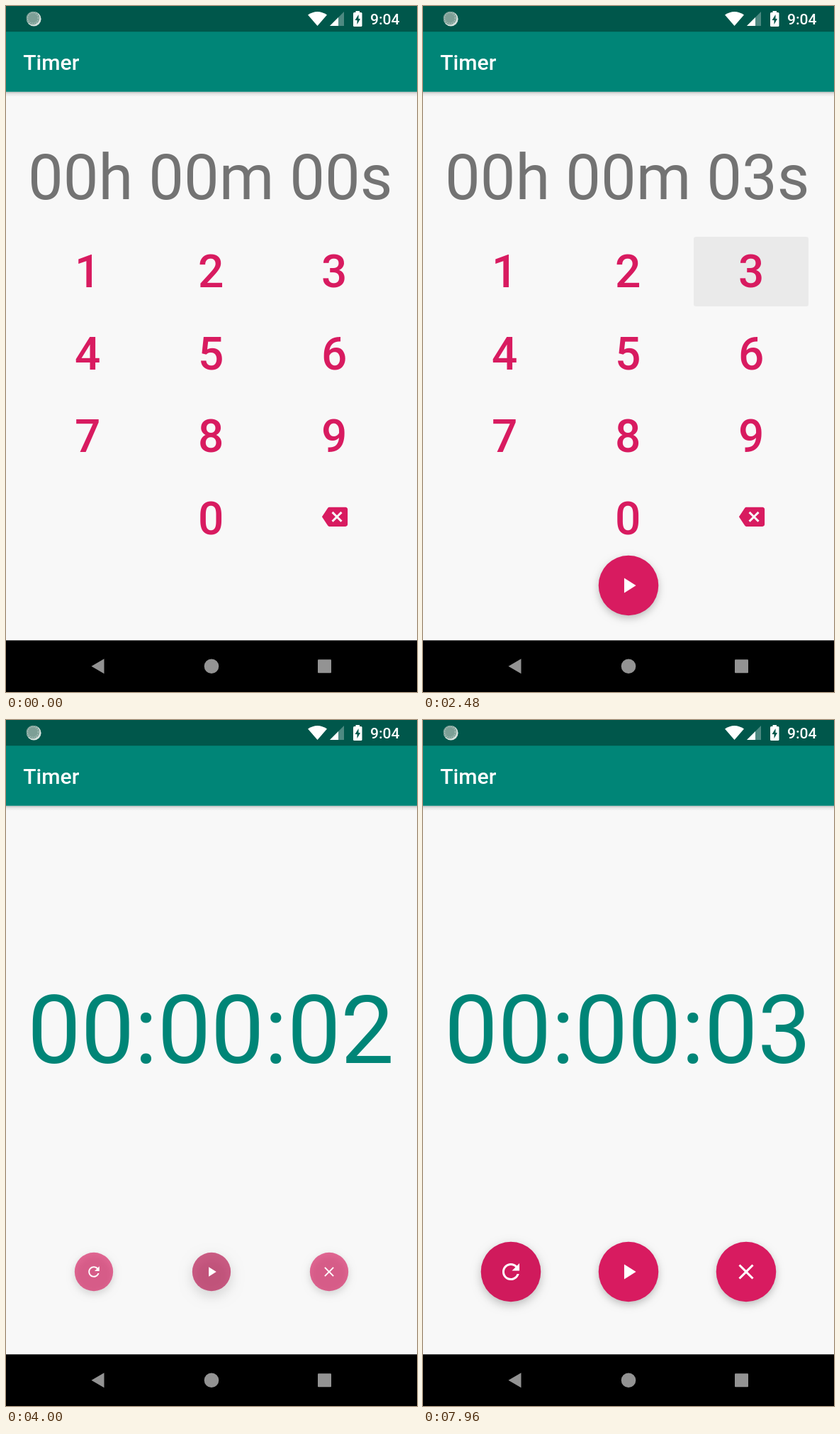
An HTML page with a canvas for the animation above (8 s loop, 580x966 px).

```html
<!DOCTYPE html>
<html lang="en">
<head>
<meta charset="utf-8">
<title>Timer</title>
<style>
html, body { margin: 0; width: 100%; height: 100%; overflow: hidden; background: #f8f8f8; }
canvas { display: block; width: 580px; height: 966px; }
</style>
</head>
<body>
<canvas id="stage" width="580" height="966"></canvas>
<script>
const ctx = document.getElementById('stage').getContext('2d');
const LOOP = 8000, STEP = 40;
const W = 580, TOP = 120.8, BOTTOM = 893.3;
const UNIT = 1.51, RADIUS = 28 * UNIT;
const PINK = '#d81b60', GREEN = '#008577', GREY = '#737373', PAPER = '#f8f8f8';
const FONT = 'Roboto, sans-serif';

// Event times in ms
const KEY_DOWN = 2040, KEY_UP = 2200;
const NEXT_DOWN = 2880, SLIDE = 2952, SLIDE_TIME = 300;
const PLAY_DOWN = 3760, PLAY_UP = 3894, PAUSE_IN = 4000;
const DONE = 5923;
const RESET_DOWN = 7400, RESET_UP = 7540;
const FAB_TIME = 200, FADE = 520;

const icons = {
  refresh: new Path2D('M17.65 6.35C16.2 4.9 14.21 4 12 4c-4.42 0-7.99 3.58-7.99 8s3.57 8 7.99 8c3.73 0 6.84-2.55 7.73-6h-2.08c-.82 2.33-3.04 4-5.65 4-3.31 0-6-2.69-6-6s2.69-6 6-6c1.66 0 3.14.69 4.22 1.78L13 11h7V4z'),
  close: new Path2D('M19 6.41L17.59 5 12 10.59 6.41 5 5 6.41 10.59 12 5 17.59 6.41 19 12 13.41 17.59 19 19 17.59 13.41 12z'),
  play: new Path2D('M8 5v14l11-7z'),
  pause: new Path2D('M6 19h4V5H6zM14 5v14h4V5z'),
  back: new Path2D('M22 3H7c-.69 0-1.23.35-1.59.88L0 12l5.41 8.11c.36.53.9.89 1.59.89h15c1.1 0 2-.9 2-2V5c0-1.1-.9-2-2-2zm-3 12.59L17.59 17 14 13.41 10.41 17 9 15.59 12.59 12 9 8.41 10.41 7 14 10.59 17.59 7 19 8.41 15.41 12 19 15.59z')
};

const clamp = v => Math.min(1, Math.max(0, v));

function bezier(x1, y1, x2, y2) {
  const at = (a, b, u) => 3 * (1 - u) * (1 - u) * u * a + 3 * (1 - u) * u * u * b + u * u * u;
  return x => {
    if (x <= 0 || x >= 1) return clamp(x);
    let lo = 0, hi = 1;
    for (let i = 0; i < 24; i++) {
      const mid = (lo + hi) / 2;
      if (at(x1, x2, mid) < x) lo = mid; else hi = mid;
    }
    return at(y1, y2, lo);
  };
}
const easeIn = bezier(0, 0, 0.2, 1);
const easeOut = bezier(0.4, 0, 1, 1);
const show = (t, start) => easeIn((t - start) / FAB_TIME);
const hide = (t, start) => 1 - easeOut((t - start) / FAB_TIME);

function text(str, x, y, size, color, weight = 400, align = 'left') {
  ctx.font = `${weight} ${size}px ${FONT}`;
  ctx.textAlign = align;
  ctx.fillStyle = color;
  ctx.fillText(str, x, y);
}

function circle(x, y, r, color) {
  ctx.beginPath();
  ctx.arc(x, y, r, 0, Math.PI * 2);
  ctx.fillStyle = color;
  ctx.fill();
}

function poly(color, ...pts) {
  ctx.beginPath();
  for (let i = 0; i < pts.length; i += 2) ctx.lineTo(pts[i], pts[i + 1]);
  ctx.fillStyle = color;
  ctx.fill();
}

function icon(name, x, y, color) {
  ctx.save();
  ctx.translate(x, y);
  ctx.scale(UNIT, UNIT);
  ctx.translate(-12, -12);
  ctx.fillStyle = color;
  ctx.fill(icons[name]);
  ctx.restore();
}

// Touch ripple: grows after the press, fades after the release
function ripple(t, down, up) {
  if (t <= down || t >= up + FADE) return null;
  const press = clamp((t - down) / 80);
  return { grow: easeIn((t - down) / 260), alpha: press * clamp(1 - (t - up) / FADE) };
}

function fab(name, x, y, scale = 1, rip = null) {
  if (scale <= 0.005) return;
  const lift = rip ? rip.alpha : 0;
  ctx.save();
  ctx.globalAlpha = scale;
  ctx.translate(x, y);
  ctx.scale(scale, scale);
  ctx.shadowColor = 'rgba(0,0,0,0.24)';
  ctx.shadowBlur = 11 + 7 * lift;
  ctx.shadowOffsetY = 4 + 3 * lift;
  circle(0, 0, RADIUS, PINK);
  ctx.shadowColor = 'transparent';
  if (rip) circle(0, 0, RADIUS * rip.grow, `rgba(0,0,0,${0.2 * lift})`);
  // The icon stays white while the button fades over the pale page
  ctx.globalAlpha = 1;
  icon(name, 0, 0, '#fff');
  ctx.restore();
}

function drawSetup(t) {
  text(`00h 00m 0${t < KEY_UP ? 0 : 3}s`, 31, 272, 88.5, GREY);

  const rip = ripple(t, KEY_DOWN, KEY_UP);
  if (rip) {
    ctx.save();
    ctx.beginPath();
    ctx.roundRect(382, 325, 162, 98, 3);
    ctx.clip();
    circle(463, 374, 96 * rip.grow, `rgba(0,0,0,${0.12 * rip.alpha})`);
    ctx.restore();
  }

  const key = (n, col, row) => text(n, 115.3 + 174 * col, 396 + 116 * row, 64, PINK, 500, 'center');
  for (let i = 0; i < 9; i++) key(i + 1, i % 3, Math.floor(i / 3));
  key(0, 1, 3);
  icon('back', 464, 719.3, PINK);
  fab('play', 290, 816, show(t, KEY_UP), ripple(t, NEXT_DOWN, SLIDE));
}

function drawTimer(t) {
  let secs = 3, color = GREEN;
  if (t >= PLAY_UP && t < RESET_UP) {
    secs = t < PLAY_UP + 1000 ? 2 : t < DONE ? 1 : 0;
    if (t >= DONE) color = PINK;
  }
  text('00:00:0' + secs, 30.3, 483, 134.2, color);

  const y = 777;
  if (t < DONE) {
    const s = hide(t, PLAY_UP);
    fab('refresh', 124, y, s);
    fab('play', 290, y, s, ripple(t, PLAY_DOWN, PLAY_UP));
    fab('close', 456, y, s);
    fab('pause', 290, y, show(t, PAUSE_IN));
    return;
  }
  const reset = t >= RESET_UP, s = show(t, DONE);
  fab('refresh', reset ? 124 : 179, y, s, ripple(t, RESET_DOWN, RESET_UP));
  fab('close', reset ? 456 : 401, y, s);
  fab('pause', 290, y, hide(t, DONE));
  if (reset) fab('play', 290, y, show(t, RESET_UP));
}

function drawStatus() {
  ctx.fillStyle = '#00574b';
  ctx.fillRect(0, 0, W, 36.2);

  circle(39.3, 18.3, 10.3, '#d5e0dc');
  circle(38, 17, 9.3, '#7d9f96');
  ctx.strokeStyle = '#a9c1ba';
  ctx.lineWidth = 1.5;
  ctx.setLineDash([1.5, 1.5]);
  ctx.beginPath();
  ctx.arc(38, 17, 7.5, 0, Math.PI * 2);
  ctx.stroke();
  ctx.setLineDash([]);

  ctx.beginPath();
  ctx.moveTo(439.5, 28);
  ctx.lineTo(426, 12.5);
  ctx.quadraticCurveTo(439.5, 3.5, 453, 12.5);
  ctx.fillStyle = '#fff';
  ctx.fill();

  poly('rgba(255,255,255,0.3)', 457, 28, 477, 8, 477, 28);
  poly('#fff', 457, 28, 469, 16, 469, 28);

  ctx.fillStyle = '#fff';
  ctx.fillRect(493.5, 7, 5.5, 4);
  ctx.beginPath();
  ctx.roundRect(490, 9, 12.5, 20, 1.5);
  ctx.fill();
  poly('#00574b', 497.5, 12, 492.5, 20, 495.5, 20, 495.5, 26, 500, 18, 497.5, 18);

  text('9:04', 514, 26, 14 * UNIT, '#fff', 500);
}

function drawBars() {
  const shade = ctx.createLinearGradient(0, TOP, 0, TOP + 7);
  shade.addColorStop(0, 'rgba(0,0,0,0.24)');
  shade.addColorStop(0.4, 'rgba(0,0,0,0.08)');
  shade.addColorStop(1, 'rgba(0,0,0,0)');
  ctx.fillStyle = shade;
  ctx.fillRect(0, TOP, W, 7);

  ctx.fillStyle = GREEN;
  ctx.fillRect(0, 36, W, TOP - 36);
  text('Timer', 16 * UNIT, 90.4, 20 * UNIT, '#fff', 500);
  drawStatus();

  ctx.fillStyle = '#000';
  ctx.fillRect(0, BOTTOM, W, 966 - BOTTOM);
  const nav = '#939393';
  poly(nav, 120.5, 929.7, 138.5, 919.2, 138.5, 940.2);
  circle(290, 929.7, 10.3, nav);
  ctx.fillStyle = nav;
  ctx.beginPath();
  ctx.roundRect(440, 920.2, 19, 19, 1);
  ctx.fill();
}

function draw(t) {
  ctx.fillStyle = PAPER;
  ctx.fillRect(0, 0, W, 966);

  const p = (1 - Math.cos(Math.PI * clamp((t - SLIDE) / SLIDE_TIME))) / 2;
  const height = Math.round(BOTTOM - TOP), shift = Math.round(p * height);
  ctx.save();
  ctx.beginPath();
  ctx.rect(0, TOP, W, BOTTOM - TOP);
  ctx.clip();
  if (p < 1) {
    ctx.save();
    ctx.translate(0, shift);
    drawSetup(t);
    ctx.restore();
  }
  if (p > 0) {
    ctx.translate(0, shift - height);
    drawTimer(t);
  }
  ctx.restore();
  drawBars();
}

const start = performance.now();
function tick() {
  const t = (performance.now() - start) % LOOP;
  draw(Math.floor(t / STEP) * STEP);
  requestAnimationFrame(tick);
}
tick();
</script>
</body>
</html>
```
